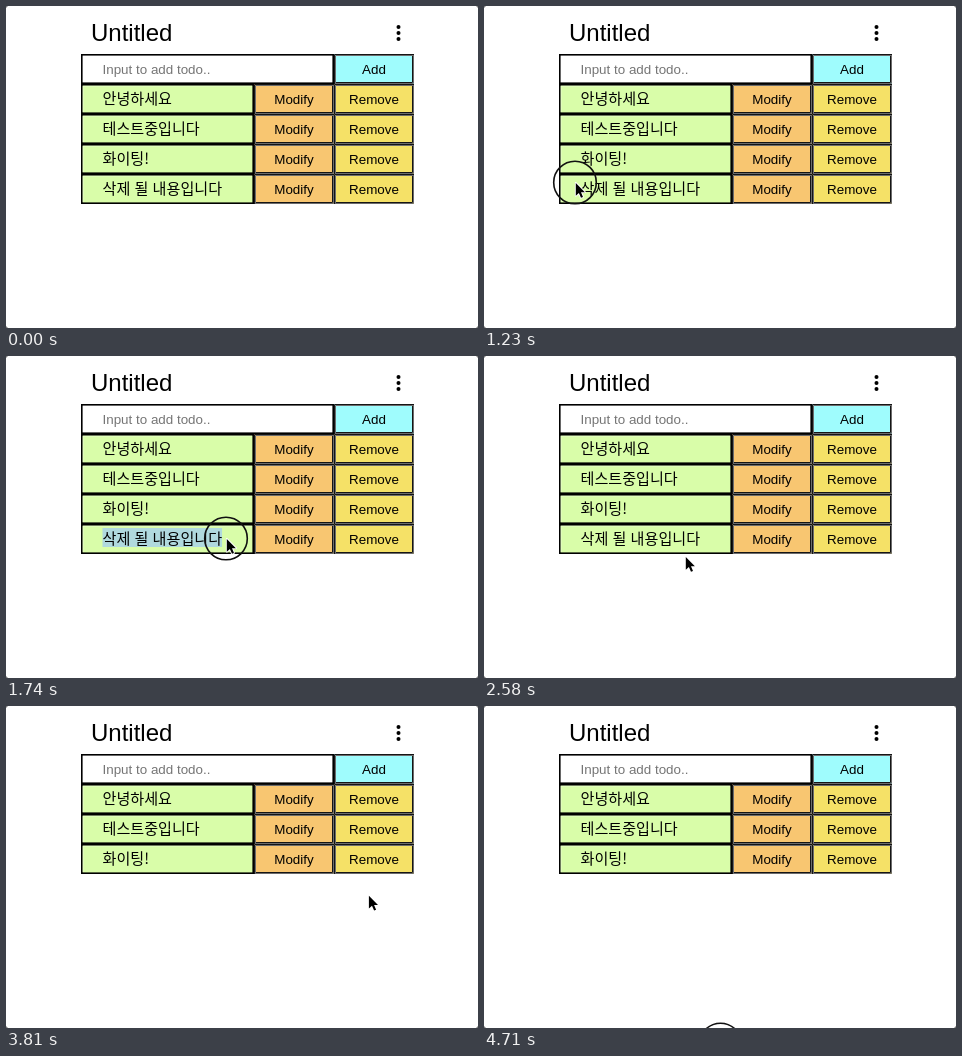
An HTML page that plays this animation: 472 by 322 pixels, repeating every 4740 ms.

```html
<!DOCTYPE html>
<html lang="ko">
<head>
<meta charset="utf-8">
<style>
  html, body { margin: 0; width: 100%; height: 100%; overflow: hidden; background: #fff; }
  svg { display: block; width: 472px; height: 322px; }
  text { font: 13.4px "Liberation Sans", Arial, sans-serif; }
  .title { font-size: 24px; }
  .item { font: 15.1px "Noto Sans CJK KR", "Noto Sans CJK JP", sans-serif; }
  .label { text-anchor: middle; }
</style>
</head>
<body>
<svg id="stage" viewBox="0 0 472 322"></svg>
<script>
const LOOP = 4740, STEP = 30;
const DARK = '#151515', LIGHT = '#6c6c6c';
const stage = document.getElementById('stage');

function add(parent, tag, attrs, content) {
  const el = document.createElementNS('http://www.w3.org/2000/svg', tag);
  for (const key in attrs) el.setAttribute(key, attrs[key]);
  if (content) el.textContent = content;
  parent.appendChild(el);
  return el;
}

function box(parent, x, y, width, height, fill) {
  return add(parent, 'rect', { x, y, width, height, fill });
}

function framed(parent, x, y, width, height, fill) {
  box(parent, x, y, width, height, '#000');
  box(parent, x + 1.6, y + 1.6, width - 3.2, height - 3.2, fill);
}

function show(el, visible) {
  el.setAttribute('visibility', visible ? 'visible' : 'hidden');
}

// One pixel wide bevel: the top-left half and the bottom-right half
function bevel(parent, x, y, w, h) {
  const line = d => add(parent, 'path', { d, fill: 'none', 'stroke-width': 1 });
  return [
    line(`M${x + .5} ${y + h}V${y + .5}H${x + w}`),
    line(`M${x + 1} ${y + h - .5}H${x + w - .5}V${y + 1}`)
  ];
}

function button(parent, x, y, label, fill) {
  const w = 80, h = 30;
  box(parent, x, y, w, h, fill);
  const outer = bevel(parent, x, y, w, h);
  const inner = bevel(parent, x + 1, y + 1, w - 2, h - 2);
  add(parent, 'text', { x: x + w / 2, y: y + 19.6, class: 'label' }, label);
  const press = pressed => {
    outer[0].setAttribute('stroke', DARK);
    outer[1].setAttribute('stroke', LIGHT);
    inner[0].setAttribute('stroke', pressed ? DARK : LIGHT);
    inner[1].setAttribute('stroke', pressed ? LIGHT : DARK);
  };
  press(false);
  return press;
}

function row(text, index) {
  const group = add(stage, 'g', {}), y = 78 + index * 30;
  framed(group, 75, y, 173, 30, '#d9fda9');
  add(group, 'path', { d: `M77.1 ${y + 28}V${y + 2.1}H246`, fill: 'none', stroke: '#fff', 'stroke-opacity': .35 });
  const selection = box(group, 96.5, y + 4, 0, 19, '#b0d9de');
  const label = add(group, 'text', { x: 96.5, y: y + 19.5, class: 'item' }, text);
  button(group, 248, y, 'Modify', '#f8c671');
  const press = button(group, 328, y, 'Remove', '#f5e167');
  return { group, selection, label, press };
}

add(stage, 'text', { x: 85, y: 35, class: 'title' }, 'Untitled');
for (const y of [21, 27, 33]) add(stage, 'circle', { cx: 392.5, cy: y, r: 2 });
framed(stage, 75, 48, 253, 30, '#fff');
add(stage, 'text', { x: 96.5, y: 67.6, fill: '#757575' }, 'Input to add todo..');
button(stage, 328, 48, 'Add', '#9ffcfd');
const rows = ['안녕하세요', '테스트중입니다', '화이팅!', '삭제 될 내용입니다'].map(row);
const last = rows[3];

// Rounded window corners
add(stage, 'path', { d: 'M0 0h2l-2 2zM472 0v2l-2 -2zM0 322v-2l2 2zM472 322h-2l2 -2z', fill: '#777' });

const pointer = add(stage, 'g', {});
const ring = add(pointer, 'circle', { r: 21.3, fill: 'none', stroke: '#111', 'stroke-width': 1.6 });
add(pointer, 'path', {
  d: 'M.8 .5V13.2L3.9 10.5 6 15.3 8 14.4 6 9.7H9.9Z',
  stroke: '#fff', 'stroke-width': 1.8, 'paint-order': 'stroke', 'stroke-linejoin': 'round'
});

const smooth = u => u * u * (3 - 2 * u);
const easeOut = u => 1 - (1 - u) ** 1.6;
const easeIn = u => u ** 1.8;
const linear = u => u;

// Each move is a quadratic curve: start, end, from, bend, to, easing
const moves = [
  [0, 540, [234, 324], [190, 282], [154, 238], linear],
  [540, 900, [154, 238], [118, 200], [91, 176.5], easeOut],
  [1230, 1740, [91, 176.5], [155, 180], [220, 182.5], smooth],
  [1980, 2280, [220, 182.5], [213, 195], [201, 200.5], smooth],
  [2580, 2880, [201, 200.5], [278, 263], [363, 188], smooth],
  [3780, 4230, [363, 188], [304, 274], [205, 328], easeIn],
  [4230, 4710, [205, 328], [220, 345], [236.5, 338.5], smooth]
];
const presses = [[1230, 2010], [2370, 2460], [3210, 3270], [4710, 4740]];

function position(t) {
  const [start, end, from, bend, to, ease] = moves.filter(m => m[0] <= t).pop();
  const u = ease(Math.min(1, (t - start) / (end - start)));
  return from.map((p, i) => p * (1 - u) ** 2 + 2 * bend[i] * u * (1 - u) + to[i] * u * u);
}

function selectedWidth(t) {
  if (t < 1230 || t >= 2370) return 0;
  const reach = position(Math.min(t, 1740))[0] - 96.5;
  let best = 0;
  for (let n = 1; n <= last.label.getNumberOfChars(); n++) {
    const width = last.label.getSubStringLength(0, n);
    if (Math.abs(width - reach) < Math.abs(best - reach)) best = width;
  }
  return best;
}

function render(t) {
  const [x, y] = position(t);
  pointer.setAttribute('transform', `translate(${x} ${y})`);
  show(pointer, t >= STEP);
  ring.setAttribute('display', presses.some(([a, b]) => t >= a && t < b) ? 'inline' : 'none');
  last.selection.setAttribute('width', selectedWidth(t));
  last.press(t >= 3210 && t < 3300);
  show(last.group, t < 3300);
}

const begin = performance.now();
function frame() {
  const t = (performance.now() - begin) % LOOP;
  render(Math.floor(t / STEP) * STEP);
  requestAnimationFrame(frame);
}
render(0);
requestAnimationFrame(frame);
</script>
</body>
</html>
```
